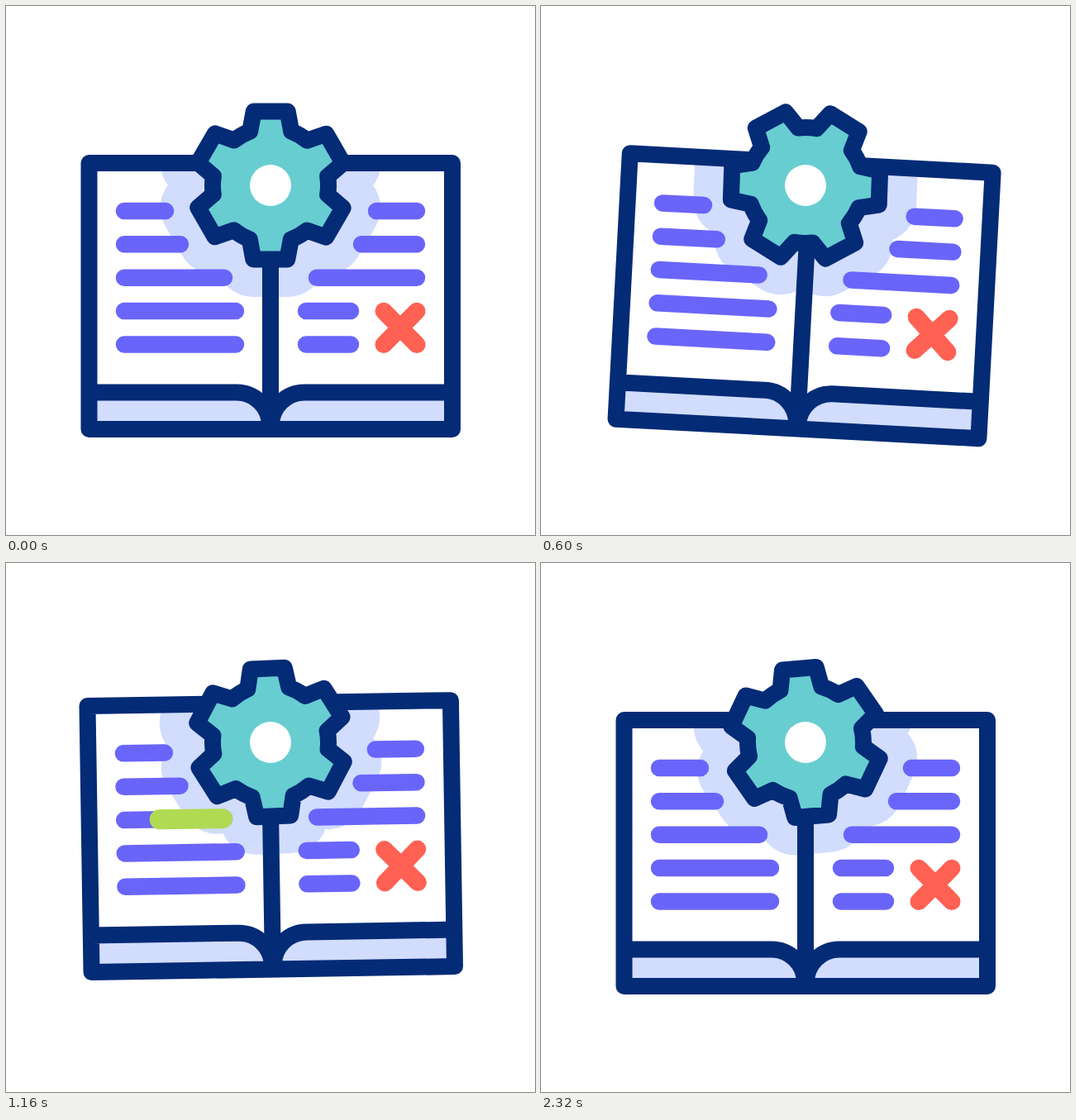
Write an HTML page that moves like this. It is 640x640 px and loops after 2360 ms.

```html
<!DOCTYPE html>
<html lang="en">
<head>
<meta charset="utf-8">
<title>Book and gear</title>
<style>
  html, body { margin: 0; width: 100%; height: 100%; overflow: hidden; background: #fff; }
  svg { display: block; width: 100vw; height: 100vh; }
  .ink { fill: none; stroke: #032b76; stroke-width: 20; stroke-linejoin: round; }
  .text { stroke: #6965fa; stroke-width: 20.5; stroke-linecap: round; }
  .cross { stroke: #ff6153; stroke-width: 21; stroke-linecap: round; }
  .mark { stroke: #b1da53; stroke-width: 24; stroke-linecap: round; }
  .shade { fill: #d2dcfd; }
</style>
</head>
<body>
<svg viewBox="0 0 640 640">
  <defs>
    <clipPath id="pages"><rect id="window" x="100" y="190" width="440" height="322"/></clipPath>
  </defs>
  <g class="book">
    <rect x="100.5" y="190" width="439.5" height="322" fill="#fff"/>
    <path class="shade" d="M100 467.5H279A40 40 0 0 1 319 507.5V512H100ZM540 467.5H361A40 40 0 0 0 321 507.5V512H540Z"/>
  </g>
  <g clip-path="url(#pages)">
    <path id="shadow" class="shade" stroke="#d2dcfd" stroke-width="91" stroke-linejoin="round"/>
  </g>
  <g class="book">
    <path class="ink" d="M100.5 190H540V512H100.5ZM320 190V512M100 467.5H279A40 40 0 0 1 319 507.5M540 467.5H361A40 40 0 0 0 321 507.5"/>
    <g id="lines"></g>
  </g>
  <path id="gear" class="ink" style="fill:#67cdd1"/>
  <circle cx="320" cy="217" r="25" fill="#fff"/>
</svg>
<script>
const LOOP = 2360;
const $ = id => document.getElementById(id);

// Keyframes: [time in ms, value]
const LIFT = [[0, 0], [400, -33], [790, 29.5], [1170, -20.5], [1480, 0]];
const TILT = [[0, 0], [150, -2], [580, 3.1], [1010, -3], [1350, 2.1], [1680, 0]];

const ease = p => (1 - Math.cos(Math.PI * Math.min(1, Math.max(0, p)))) / 2;
const ramp = (t, from, to) => ease((t - from) / (to - from));

function track(keys, t) {
  for (let i = 1; i < keys.length; i++) {
    const [t0, a] = keys[i - 1], [t1, b] = keys[i];
    if (t < t1) return a + (b - a) * ramp(t, t0, t1);
  }
  return keys[keys.length - 1][1];
}

function gearPath() {
  let d = '';
  for (let i = 0; i < 6; i++) {
    const a = i * Math.PI / 3, c = Math.cos(a), s = Math.sin(a);
    const at = (x, y) => `${(x * c - y * s).toFixed(2)} ${(x * s + y * c).toFixed(2)}`;
    d += `${i ? 'A70 70 0 0 1 ' : 'M'}${at(-25, -65.4)}` +
         `L${at(-20.5, -89.5)}L${at(20.5, -89.5)}L${at(25, -65.4)}`;
  }
  return d + 'A70 70 0 0 1 -25 -65.4Z';
}

function addLine(cls, x1, y1, x2, y2) {
  const el = document.createElementNS('http://www.w3.org/2000/svg', 'line');
  el.setAttribute('class', cls);
  setLine(el, x1, y1, x2, y2);
  $('lines').append(el);
  return el;
}

function setLine(el, x1, y1, x2, y2) {
  el.setAttribute('x1', x1);
  el.setAttribute('y1', y1);
  el.setAttribute('x2', x2);
  el.setAttribute('y2', y2);
}

// Each row: left line start and end, right line start and end
[[143, 193, 448, 497], [143, 211, 430, 497], [143, 264, 376, 497],
 [143, 278, 363, 417], [143, 278, 363, 417]].forEach(([a, b, c, d], i) => {
  const y = 248 + i * 40.35;
  addLine('text', a, y, b, y);
  addLine('text', c, y, d, y);
});
const CROSS = [[457, 369.2, 497, 409.6], [457, 409.6, 497, 369.2]];
CROSS.forEach(p => addLine('cross', ...p));

// Highlights are drawn from the left, then wiped from the left
const marks = [
  { path: [144.5, 328.7, 262, 328.7], draw: [740, 1120], wipe: [1000, 1400] },
  ...CROSS.map(path => ({ path, draw: [1500, 1800], wipe: [1760, 2080] }))
].map(m => ({ ...m, el: addLine('mark', ...m.path) }));

function showMark({ el, path: [x1, y1, x2, y2], draw, wipe }, t) {
  const end = ramp(t, ...draw), start = ramp(t, ...wipe);
  el.style.display = end > start ? '' : 'none';
  const x = p => x1 + (x2 - x1) * p, y = p => y1 + (y2 - y1) * p;
  setLine(el, x(start), y(start), x(end), y(end));
}

$('gear').setAttribute('d', gearPath());
$('shadow').setAttribute('d', gearPath());
const bookParts = [...document.querySelectorAll('.book'), $('window')];

function render(t) {
  const pose = `translate(0 ${track(LIFT, t)}) rotate(${track(TILT, t)} 320 320)`;
  bookParts.forEach(el => el.setAttribute('transform', pose));
  const spin = `translate(320 217) rotate(${t * 0.153})`;
  $('gear').setAttribute('transform', spin);
  $('shadow').setAttribute('transform', spin);
  marks.forEach(m => showMark(m, t));
}

const begin = performance.now();
function tick() {
  render((performance.now() - begin) % LOOP);
  requestAnimationFrame(tick);
}
tick();
</script>
</body>
</html>
```
